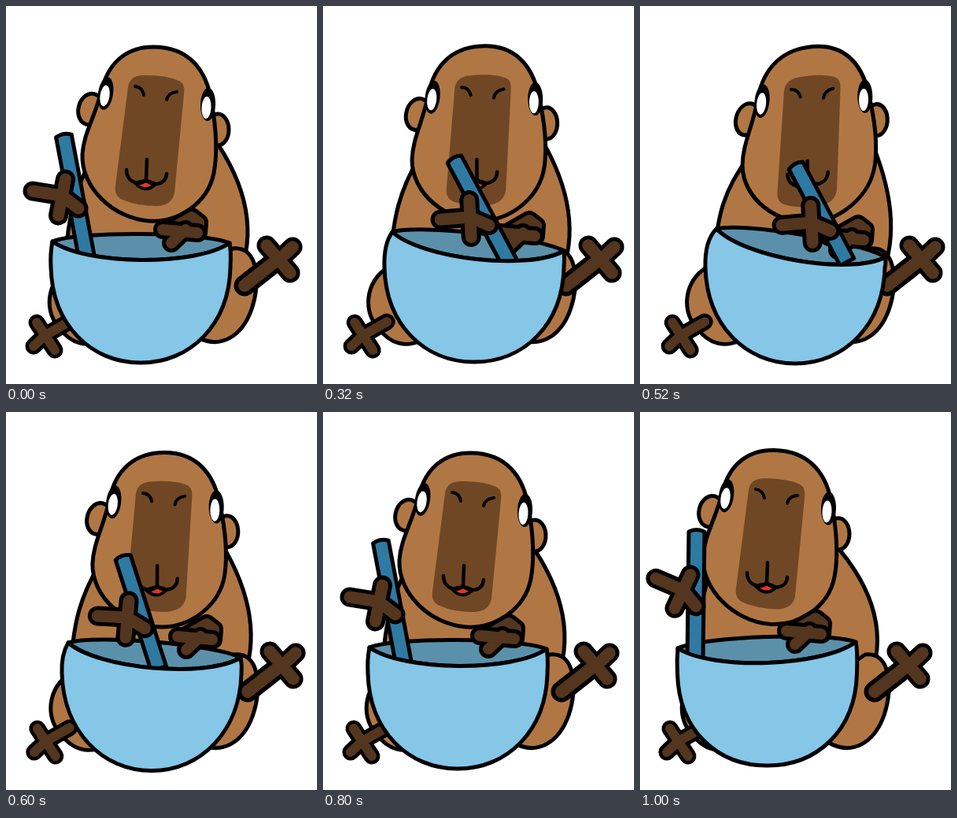
An HTML page with a canvas for the animation above (1.08 s loop, 395 px wide and 480 px high).

```html
<!DOCTYPE html>
<html>
<head>
<meta charset="utf-8">
<style>
html, body { margin: 0; height: 100%; overflow: hidden; background: #fff; }
canvas { display: block; }
</style>
</head>
<body>
<canvas id="stage" width="395" height="480"></canvas>
<script>
const ctx = document.getElementById('stage').getContext('2d');
const FUR = '#b07745', LIMB = '#54351d', MUZZLE = '#704724';
const BOWL = '#86c6e7', INSIDE = '#5b90ab', STICK = '#2f7aa2';
const LOOP = 1080, STEP = 40;

// body shift | bowl x, rim left xy, rim right xy | head xy, shear y, shear x |
// resting paw shift | stick top xy, bottom xy | stirring paw xy, angle
const far = [-5, 161.5, 48, 300, 274, 292, 173, 116.5, .015, 0, -13, -6, 72, 150, 70, 316, 54, 228, 14];
const left = [0, 171, 59, 299, 284, 301, 190, 120, 0, 0, 0, 0, 73, 163, 103, 322, 71, 243, 0];
const inward = [3, 181, 71, 295, 294, 304, 198, 118, -.02, .015, 12, 0, 124, 171, 153, 326, 121, 251, 0];
const middle = [6, 192, 88, 287, 306, 311, 203, 119, -.09, .045, 26, 4, 166, 193, 238, 328, 187, 270, -14];
const right = [11, 197, 97, 283, 312, 319, 219, 120, -.155, .06, 41, 9, 197, 201, 263, 325, 218, 277, -14];
const back = [4, 185, 79, 293, 298, 312, 200.5, 119.5, -.06, .035, 19, 1, 148, 183, 194, 326, 154, 263, -6];

// start time, pose, whether it glides to the next pose
const keys = [
  [0, left, false], [120, inward, true], [320, middle, true], [520, right, false],
  [600, back, true], [800, left, true], [1000, far, false]
];

function poseAt(time) {
  const t = Math.floor(time % LOOP / STEP) * STEP;
  const i = keys.findLastIndex(k => k[0] <= t);
  const [start, pose, glides] = keys[i];
  if (!glides) return pose;
  const [end, next] = keys[i + 1];
  const f = (t - start) / (end - start);
  return pose.map((v, n) => v + (next[n] - v) * f);
}

function shape(d, fill, width = 5) {
  const p = new Path2D(d);
  if (fill) {
    ctx.fillStyle = fill;
    ctx.fill(p);
  }
  if (width) {
    ctx.lineWidth = width;
    ctx.strokeStyle = '#000';
    ctx.stroke(p);
  }
}

function tube(d, width, color, edge = 5) {
  const p = new Path2D(d);
  for (const [w, c] of [[width, '#000'], [width - 2 * edge, color]]) {
    ctx.lineWidth = w;
    ctx.strokeStyle = c;
    ctx.stroke(p);
  }
}

function oval(x, y, rx, ry, tilt, fill, width = 0) {
  const p = new Path2D();
  p.ellipse(x, y, rx, ry, tilt, 0, 7);
  shape(p, fill, width);
}

function at(x, y, draw, angle = 0) {
  ctx.save();
  ctx.translate(x, y);
  ctx.rotate(angle * Math.PI / 180);
  draw();
  ctx.restore();
}

function body(b, hx) {
  const top = hx - 190, base = b * 1.7;
  shape(`M${110 + top} 190 C${90 + base} 230 ${76 + base} 265 ${75 + base} 345
    L${295 + b} 345 C${318 + b} 290 ${308 + b} 230 ${262 + top} 165Z`, FUR);
  at(b * .4, 0, () => {
    shape('M88 328C53 342 46 385 67 408C84 431 104 433 122 425L200 380Z', FUR);
    shape('M240 419C272 438 300 419 312 385C324 350 320 304 288 308L240 340Z', FUR);
  });
  at(b * .2, 0, () => tube('M80 401L50 418M39 402L62 437M52 416L35 432', 21, LIMB, 4.5));
  at(b, 0, () => {
    tube('M303 355L345 322', 27, LIMB);
    tube('M331 304L361 339M345 324L364 306', 25, LIMB);
    tube('M303 355L345 322', 26, LIMB, 5);
    ctx.lineWidth = 15;
    ctx.strokeStyle = LIMB;
    ctx.stroke(new Path2D('M331 304L361 339M345 324L364 306'));
  });
}

function head(x, y, shearY, shearX) {
  ctx.save();
  ctx.transform(1, shearY, shearX, 1, x, y);
  ctx.translate(-190, -120);
  oval(107, 131, 15, 20, .25, FUR, 5);
  oval(269, 157, 14, 20, 0, FUR, 5);
  shape(`M187 52C233 52 255 82 261 122C267 155 269 185 264 212
    C256 252 217 275 182 273C136 270 95 230 97 188C99 160 113 142 122 105
    C131 70 155 52 187 52Z`, FUR);
  shape(`M155 103Q157 89 173 88Q203 87 220 95Q228 99 226 112L214 237
    Q211 253 192 254Q166 254 148 246Q137 241 139 228Z`, MUZZLE, 0);
  oval(126.5, 111, 9.5, 21, .15, '#000');
  oval(125.5, 114, 6, 13.5, .15, '#fff');
  oval(256.5, 125, 9.5, 21, .03, '#000');
  oval(254.5, 129, 6, 14, .05, '#fff');
  shape('M164 102Q173 103 175 113M204 119Q206 110 217 109', null, 4);
  shape('M164 225Q178 219 190 226Q177 239 164 225Z', '#e03623', 4);
  shape('M179 195L178 220M153 208C153 226 173 229 178 220C183 229 203 229 204 213', null, 4.5);
  ctx.restore();
}

function restingPaw() {
  tube('M208 284L236 268L245 275L244 288', 24, LIMB);
  tube('M199 284L243 288M210 301L228 284', 24, LIMB);
}

function stirringPaw() {
  tube('M-37 -8L0 -2L21 14M4.5 -23L-4.5 23', 25, LIMB);
}

function draw(time) {
  const [b, bx, lx, ly, rx, ry, hx, hy, shearY, shearX, px, py,
    sx, sy, ex, ey, wx, wy, wa] = poseAt(time);
  const dx = (rx - lx) / 2, dy = (ry - ly) / 2;
  const cx = lx + dx, cy = ly + dy;
  // point on the rim plane: u along the rim, v pixels below it
  const rim = (u, v) => `${cx + u * dx - v * dy / dx} ${cy + u * dy + v}`;
  const L = `${lx} ${ly}`, R = `${rx} ${ry}`;
  const front = `C${rim(.62, 30)} ${rim(-.62, 30)} ${L}`;
  const bottom = cy + 153;

  ctx.fillStyle = '#fff';
  ctx.fillRect(0, 0, 395, 480);
  ctx.lineCap = ctx.lineJoin = 'round';

  body(b, hx);
  head(hx, hy, shearY, shearX);
  shape(`M${L}C${rim(-.7, -14)} ${rim(.7, -14)} ${R}${front}Z`, INSIDE);
  at(px, py, restingPaw);

  ctx.lineCap = 'butt';
  const len = Math.hypot(ex - sx, ey - sy);
  at(sx, sy, () => shape(`M-10 2Q0 -3 10 2V${len}H-10Z`, STICK),
    Math.atan2(ey - sy, ex - sx) * 180 / Math.PI - 90);
  ctx.lineCap = 'round';

  shape(`M${L}Q${bx - 115} ${ly + 15} ${bx - 114} 332
    C${bx - 112} 405 ${bx - 63} ${bottom} ${bx} ${bottom}
    C${bx + 63} ${bottom} ${bx + 112} 405 ${bx + 114} 332
    Q${bx + 115} ${ry + 10} ${R}${front}Z`, BOWL);
  at(wx, wy, stirringPaw, wa);
}

const began = performance.now();
function tick() {
  draw(performance.now() - began);
  requestAnimationFrame(tick);
}
tick();
</script>
</body>
</html>
```
